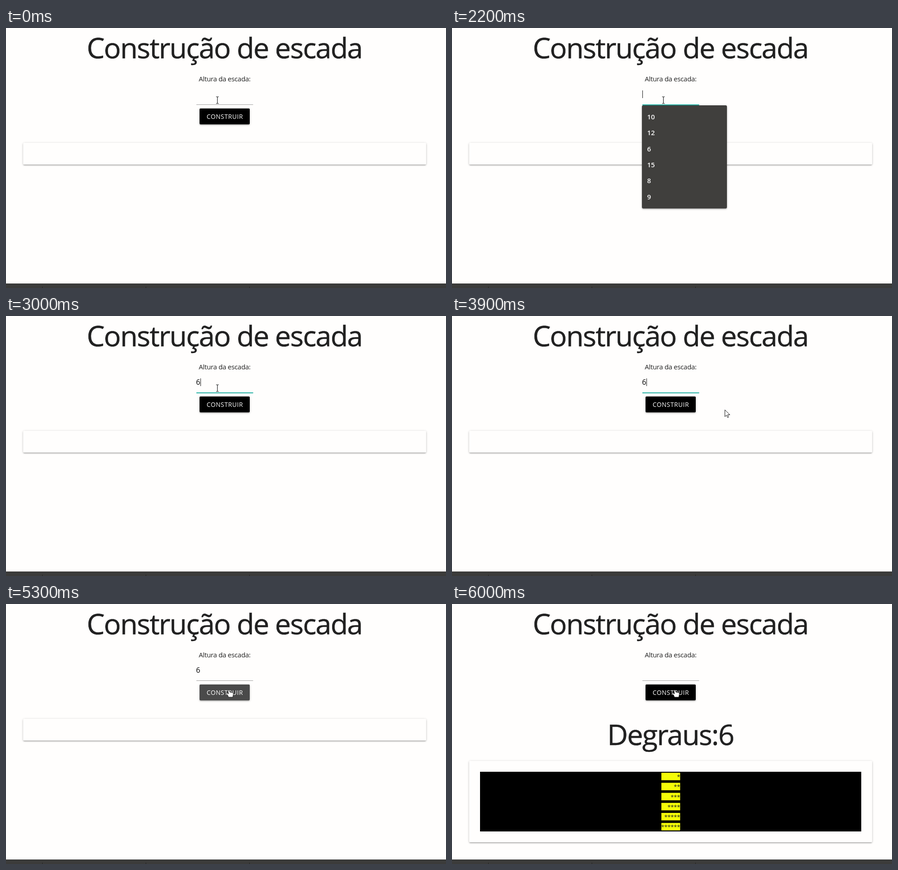
Recreate the animation shown at these times as an HTML page. Size 973x575 px, loop 8 s.

```html
<!DOCTYPE html>
<html lang="pt">
<head>
<meta charset="utf-8">
<title>Escada</title>
<style>
html, body { margin: 0; width: 100%; height: 100%; overflow: hidden; background: #fffefd; }
div, svg { position: absolute; }
svg { left: 0; top: 0; width: 100%; height: 100%; }
text { font-family: "Open Sans", "Noto Sans", sans-serif; white-space: pre; }
.mid { text-anchor: middle; }
.big { font-size: 63px; letter-spacing: -1.9px; fill: #212121; stroke: #212121; stroke-width: .5px; }
.card {
  border-radius: 2px;
  box-shadow: 0 2px 2px rgba(0,0,0,.14), 0 3px 1px -2px rgba(0,0,0,.12), 0 1px 5px rgba(0,0,0,.2);
}
#panel { left: 38px; width: 891px; background: #fffefd; }
#button { left: 428px; top: 178px; width: 111px; height: 35px; }
#menu { left: 420px; top: 171px; width: 188px; height: 228px; border-radius: 3px; background: #403f3d; }
#menu text { font-size: 15px; font-weight: 600; fill: #fafafa; }
</style>
</head>
<body>
<div id="panel" class="card"></div>
<div id="button" class="card"></div>

<svg>
  <text class="mid big" x="483" y="67">Construção de escada</text>
  <text class="mid" x="483.5" y="118" font-size="15" letter-spacing="-.32" fill="#212121">Altura da escada:</text>
  <text class="mid" x="484" y="200.5" font-size="13.7" letter-spacing=".6" fill="#fff">CONSTRUIR</text>
  <text id="value" x="420.3" y="152" font-size="16">6</text>
  <rect id="caret" y="138" width="1" height="17" fill="#111"/>
  <rect x="421" y="169" width="125.5" height="1" fill="#9e9e9e"/>
  <rect id="focus" x="421" y="169" width="125.5" height="2" fill="#22b0a3"/>
  <g id="result">
    <text class="mid big" x="483" y="312">Degraus:6</text>
    <rect x="62" y="371" width="843" height="132"/>
    <g id="stairs"></g>
  </g>
  <rect y="565" width="973" height="10" fill="#3b3b3a"/>
  <path d="M80.5 572v3M309.5 572v3M538.5 572v3" stroke="#222"/>
</svg>

<div id="menu" class="card"><svg id="options"></svg></div>

<svg>
  <g id="beam" fill="none">
    <path d="M-3 -7.5H3M0 -7.5V7.5M-3 7.5H3" stroke="#fff" stroke-width="3"/>
    <path d="M-3 -7.5H-1L0 -6.5L1 -7.5H3M0 -6.5V6.5M-3 7.5H-1L0 6.5L1 7.5H3" stroke="#222" stroke-width="1.2"/>
  </g>
  <path id="arrow" d="M0 0V15L3.5 11.7L6 17L8.3 16L6 10.8H11Z" fill="#fff" stroke="#111"/>
  <path id="hand" d="M-2 0Q0 -2 1.2 .5L2.2 4L8 5Q10 5.5 9.5 9L8.5 15H-1L-2.5 11L-6 7.5Q-5.5 5 -3.5 6.3L-1 8Z" fill="#fff" stroke="#111" stroke-width=".8"/>
</svg>

<script>
const $ = id => document.getElementById(id);
const show = (id, on) => $(id).style.visibility = on ? 'visible' : 'hidden';
const ramp = (t, from, to) => Math.min(1, Math.max(0, (t - from) / (to - from)));
const smooth = p => p * p * (3 - 2 * p);
const curve = (p, a, b, c) => a * (1 - p) ** 2 + 2 * b * p * (1 - p) + c * p * p;

$('options').innerHTML = [10, 12, 6, 15, 8, 9]
  .map((n, i) => `<text x="11.5" y="${31 + i * 35.3}">${n}</text>`).join('');

for (let n = 1; n <= 6; n++) {
  const y = 351 + n * 22.2;
  $('stairs').innerHTML += `<rect x="463" y="${y}" width="41.5" height="16.5" fill="#f4fc08"/>
    <text x="504.5" y="${y + 14}" font-size="12.7" text-anchor="end" fill="#222">${'*'.repeat(n)}</text>`;
}

function drawMenu(t) {
  const closing = ramp(Math.min(t, 2700), 2400, 2800) ** 1.25;
  show('menu', t >= 1100 && t < 3000);
  $('menu').style.opacity = 1 - closing;
  $('menu').style.transform = `scale(${1 - .055 * closing})`;
}

function drawField(t) {
  const typed = t >= 2400;
  const blinkOff = t >= 1900 && (t - 1900) % 1300 < 300;
  show('value', typed && t < 5500);
  show('caret', t >= 1100 && t < 5100 && !blinkOff);
  $('caret').setAttribute('x', typed ? 430 : 421);
  $('focus').style.opacity = ramp(t, 1000, 1200) * (1 - ramp(t, 5000, 5300));
}

function drawResult(t) {
  const shade = 74 * ramp(t, 5000, 5300) * (1 - ramp(t, 5400, 6000));
  $('button').style.background = `rgb(${shade},${shade},${shade})`;
  const built = t >= 5500;
  show('result', built);
  $('panel').style.top = (built ? 347 : 254) + 'px';
  $('panel').style.height = (built ? 180 : 48) + 'px';
}

// The pointer arcs away to the right, then swings back under the button
function drawPointer(t) {
  const out = ramp(t, 3100, 3300), back = smooth(ramp(t, 3500, 4500));
  const x = back ? curve(back, 629, 610, 493) : curve(out, 467.5, 585, 629);
  const y = back ? curve(back, 172, 245, 191) : curve(out, 159.5, 110, 172);
  const overButton = x < 539 && y > 178 && y < 213;
  const shape = overButton ? 'hand' : out ? 'arrow' : 'beam';
  for (const id of ['beam', 'arrow', 'hand']) show(id, id === shape);
  $(shape).setAttribute('transform', `translate(${x} ${y})`);
}

const start = performance.now();
function frame() {
  // The picture advances in tenths of a second
  const t = Math.floor((performance.now() - start) % 8000 / 100) * 100;
  for (const draw of [drawMenu, drawField, drawResult, drawPointer]) draw(t);
  requestAnimationFrame(frame);
}
frame();
</script>
</body>
</html>
```
